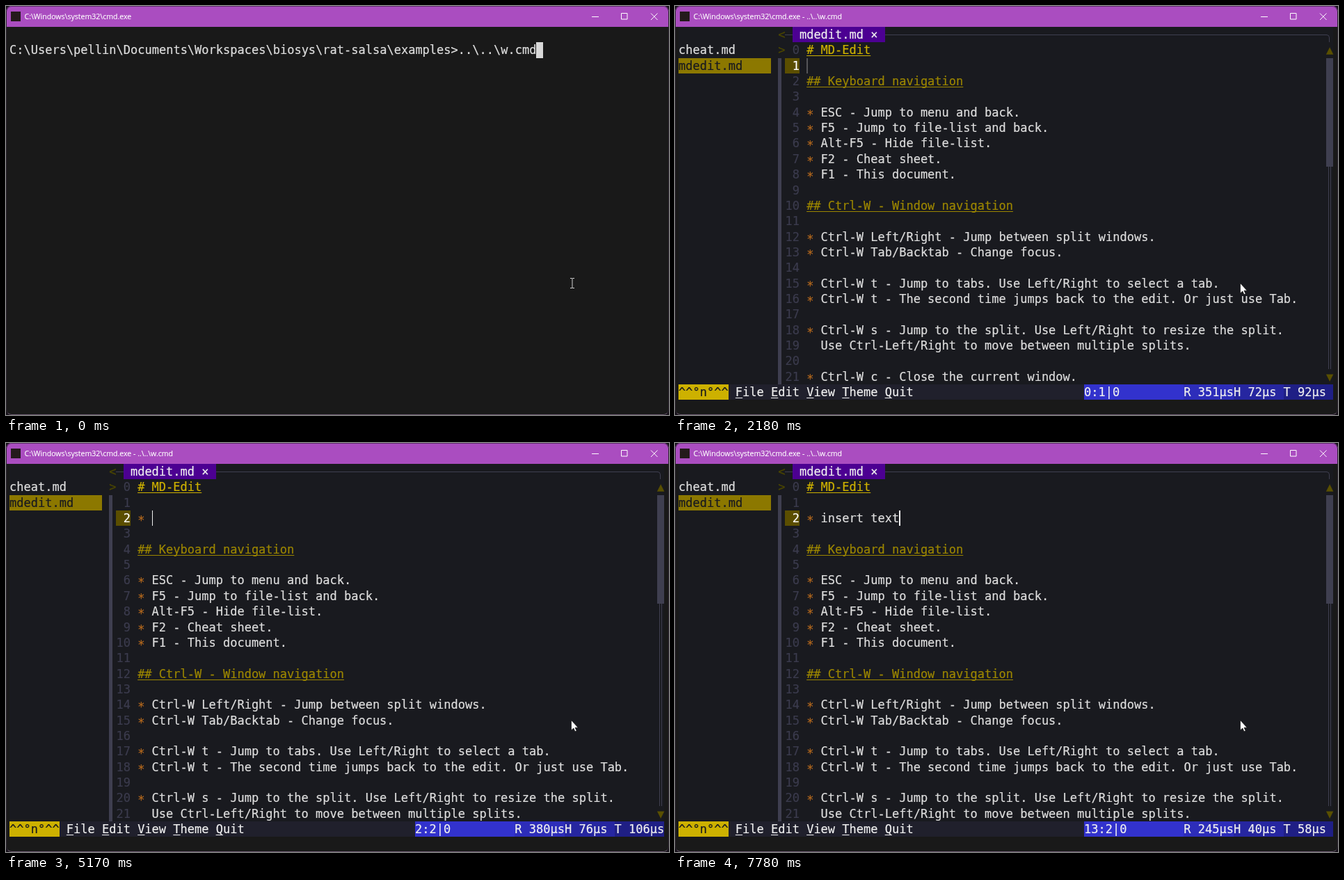
Animation of 953 by 588 pixels, one loop 8000 ms. Source, as an HTML page:

```html
<!DOCTYPE html>
<html lang="en">
<head>
<meta charset="utf-8">
<title>Terminal markdown editor</title>
<style>
  html, body { margin: 0; width: 100%; height: 100%; overflow: hidden; background: #17121a; }
  #win { position: absolute; inset: 0; background: #191919; border-radius: 8px; overflow: hidden; }
  #win::after { content: ""; position: absolute; inset: 0; border-radius: 8px; border: 1px solid #2c2430; border-top-color: #5d2d69; border-bottom-color: #6b5a70; }
  #bar { position: absolute; inset: 0 0 auto; height: 30px; background: #aa4dc0; }
  #icon { position: absolute; left: 7px; top: 8px; width: 14px; height: 14px; background: #241a1c; }
  #title { position: absolute; left: 26.5px; top: 8px; font: 10.55px/15px "Open Sans", "Noto Sans", sans-serif; color: #fff; white-space: pre; -webkit-text-stroke: .15px; }
  svg { position: absolute; left: 0; top: 0; fill: none; }
  #term span { position: absolute; font: 17px/22.35px "DejaVu Sans Mono", monospace; white-space: pre; color: #dedede; -webkit-text-stroke: .2px; }
  #term u, #term .h { text-decoration: underline 1px; text-underline-offset: 2px; text-decoration-skip-ink: none; }
  #term i { position: absolute; }
</style>
</head>
<body>
<div id="win">
  <div id="bar">
    <div id="icon"></div>
    <div id="title"></div>
    <svg width="953" height="30" stroke="#fff"><path d="M842 15.5h10M884.5 10.5h8.5v8.5h-8.5zM927 10.5l9.5 9.5M936.5 10.5l-9.5 9.5"/></svg>
  </div>
  <div id="term"></div>
  <svg width="953" height="588">
    <path id="arrow" d="M812.5 398.5v14.5l3.3-3 2.2 4.8 2.2-1-2.2-4.6h4.3z" fill="#fff" stroke="#111" stroke-width=".7"/>
    <path id="beam" d="M811 391.5h2.3l.7.5.7-.5h2.3M814 392v13.5M811 405.5h2.3l.7-.5.7.5h2.3" stroke="#d0d0d0"/>
  </svg>
</div>
<script>
const LOOP = 8000, CW = 10.23, CH = 22.35, X0 = 5, Y0 = 30;
const PROMPT = 'C:\\Users\\pellin\\Documents\\Workspaces\\biosys\\rat-salsa\\examples>..\\..\\w.cmd';
const LINE = '#3f3f50', OLIVE = '#5a5000', TYPED = '* insert text';
const DOC = `# MD-Edit

## Keyboard navigation

* ESC - Jump to menu and back.
* F5 - Jump to file-list and back.
* Alt-F5 - Hide file-list.
* F2 - Cheat sheet.
* F1 - This document.

## Ctrl-W - Window navigation

* Ctrl-W Left/Right - Jump between split windows.
* Ctrl-W Tab/Backtab - Change focus.

* Ctrl-W t - Jump to tabs. Use Left/Right to select a tab.
* Ctrl-W t - The second time jumps back to the edit. Or just use Tab.

* Ctrl-W s - Jump to the split. Use Left/Right to resize the split.
  Use Ctrl-Left/Right to move between multiple splits.

* Ctrl-W c - Close the current window.`.split('\n');

// Shell and file-list steps: [time, selected file, timings]
const START = [
  [200, -1, 'R 46µs'],
  [600, 0, 'R 46µs H 15µs'],
  [1060, 1, 'R 46µs H 21µs']
];
// Editor steps: [time, lines inserted, cursor line, characters typed, timings]
const EDIT = [
  [1320, 0, 0, 0, 'R 351µsH 64µs T 92µs'],
  [2180, 0, 1, 0, 'R 351µsH 72µs T 92µs'],
  [2780, 1, 2, 0, 'R 242µsH 81µs A 7µs'],
  [2980, 1, 2, 0, 'R 318µsH 78µs T 88µs'],
  [3440, 2, 3, 0, 'R 233µsH 75µs A 6µs'],
  [3640, 2, 3, 0, 'R 342µsH 71µs T 95µs'],
  [4040, 2, 2, 0, 'R 327µsH 69µs T 95µs'],
  [4700, 2, 2, 1, 'R 226µsH 74µs A 6µs'],
  [4900, 2, 2, 1, 'R 305µsH 70µs T 91µs'],
  [4970, 2, 2, 2, 'R 214µsH 72µs A 5µs'],
  [5170, 2, 2, 2, 'R 380µsH 76µs T 106µs'],
  [6180, 2, 2, 3, 'R 167µsH 53µs A 4µs'],
  [6310, 2, 2, 4, 'R 184µsH 51µs A 5µs'],
  [6510, 2, 2, 5, 'R 172µsH 48µs A 4µs'],
  [6570, 2, 2, 6, 'R 191µsH 50µs A 5µs'],
  [6640, 2, 2, 7, 'R 178µsH 46µs A 4µs'],
  [6840, 2, 2, 8, 'R 185µsH 47µs A 5µs'],
  [6910, 2, 2, 9, 'R 169µsH 44µs A 4µs'],
  [7110, 2, 2, 10, 'R 193µsH 45µs A 5µs'],
  [7240, 2, 2, 11, 'R 176µsH 43µs A 4µs'],
  [7440, 2, 2, 12, 'R 188µsH 42µs A 5µs'],
  [7580, 2, 2, 13, 'R 171µsH 41µs A 4µs'],
  [7780, 2, 2, 13, 'R 245µsH 40µs T 58µs']
];

const $ = id => document.getElementById(id);
const px = col => X0 + col * CW, py = row => Y0 + row * CH;
const rect = (x, y, w, h, color) =>
  `<i style="left:${x}px;top:${y}px;width:${w}px;height:${h}px;background:${color}"></i>`;
const cells = (col, row, w, h, color) => rect(px(col), py(row), w * CW, h * CH, color);
const text = (col, row, s, color = '', cls = '', dy = 0) =>
  `<span class="${cls}" style="left:${px(col)}px;top:${py(row) + dy}px;color:${color}">${s}</span>`;
const latest = (steps, t) => steps.filter(s => s[0] <= t).pop();

function shell(started) {
  return text(0, 1, PROMPT.replace('>', '&gt;')) +
    (started ? cells(0, 2, 1, 1, '#d8d8d8') : cells(74, 1, 1, 1, '#d8d8d8'));
}

function frame(selected, focused, position, timings) {
  let out = cells(0, 0, 14, 23, '#191a1f');
  if (selected >= 0) out += cells(0, selected + 1, 13, 1, focused ? '#6a00c2' : '#8c7800');
  ['cheat.md', 'mdedit.md'].forEach((name, i) => {
    out += text(0, i + 1, name, i != selected ? '' : focused ? '#f0f0f0' : '#191a1f');
  });
  out += text(14, 0, '&lt;', '#4b4600') + text(14, 1, '&gt;', '#4b4600') +
    rect(px(14), py(2), CW / 2, 21 * CH, LINE) +
    cells(0, 23, 92, 1, '#20202c') + cells(0, 23, 7, 1, '#cdb100') + text(0, 23, '^^°n°^^', '#191a1f');
  let col = 8;
  for (const m of ['File', 'Edit', 'View', 'Theme', 'Quit']) {
    out += text(col, 23, `<u>${m[0]}</u>${m.slice(1)}`, '#f0f0f0');
    col += m.length + 1;
  }
  out += cells(57, 23, 14, 1, '#3232cd') + cells(71, 23, 7, 1, '#2d2dba') +
    cells(78, 23, 7, 1, '#2626a0') + cells(85, 23, 7, 1, '#1f1f85');
  return out + text(57, 23, position, '#f0f0f0') + text(71, 23, timings, '#f0f0f0');
}

function docLine(s, row, plain) {
  if (s[0] == '#') return text(18, row, s, s[1] == '#' ? '#9c8600' : '#cdb100', 'h');
  if (s[0] == '*' && !plain) return text(18, row, '*', '#b5691e', '', 3) + text(19, row, s.slice(1));
  return text(18, row, s, '', '', s == '*' ? 3 : 0);
}

function editor([time, added, line, typed, timings]) {
  const lines = [...DOC.slice(0, 2), ...Array(added).fill(''), ...DOC.slice(2)].slice(0, 22);
  if (typed) lines[2] = TYPED.slice(0, typed);
  const top = py(0) + CH / 2, right = px(91) + CW / 2;
  let out = cells(14, 0, 78, 23, '#191a1f') + frame(1, false, `${typed}:${line}|0`, timings) +
    rect(px(15), top, CW, 1, LINE) + cells(16, 0, 13, 1, '#4c0092') +
    text(17, 0, 'mdedit.md ×', '#f0f0f0') +
    `<i style="left:${px(29)}px;top:${top}px;width:${right - px(29)}px;height:${CH / 2}px;` +
    `box-sizing:border-box;border:solid ${LINE};border-width:1px 1px 0 0;border-top-right-radius:5px"></i>` +
    text(91, 1, '▲', OLIVE) + text(91, 22, '▼', OLIVE) + cells(91, 2, 1, 7, LINE) +
    rect(right - 2, py(9), 1, 13 * CH, LINE) + rect(right + 1, py(9), 1, 13 * CH, LINE) +
    cells(15, line + 1, 2, 1, '#5b4e00');
  lines.forEach((s, i) => {
    out += text(15, i + 1, String(i).padStart(2), i == line ? '#fff' : '#3b3b4d') +
      docLine(s, i + 1, time == 4700 && i == 2);
  });
  return out + rect(px(18 + typed), py(line + 1), 1.6, CH, time == 2180 ? '#555558' : '#f0f0f0');
}

let shown;
function draw(now) {
  const t = now % LOOP;
  const step = latest(EDIT, t), begin = latest(START, t);
  const ibeam = t < 200 || t >= 4500 && t < 4700;
  $('beam').style.display = ibeam ? '' : 'none';
  $('arrow').style.display = ibeam ? 'none' : '';
  const key = (step || begin || [t >= 70])[0];
  if (key !== shown) {
    shown = key;
    $('title').textContent = 'C:\\Windows\\system32\\cmd.exe' + (t < 70 ? '' : ' - ..\\..\\w.cmd');
    $('term').innerHTML = step ? editor(step) : begin ? frame(begin[1], true, '', begin[2]) : shell(t >= 70);
  }
  requestAnimationFrame(tick);
}
const zero = performance.now();
const tick = () => draw(performance.now() - zero);
tick();
</script>
</body>
</html>
```
